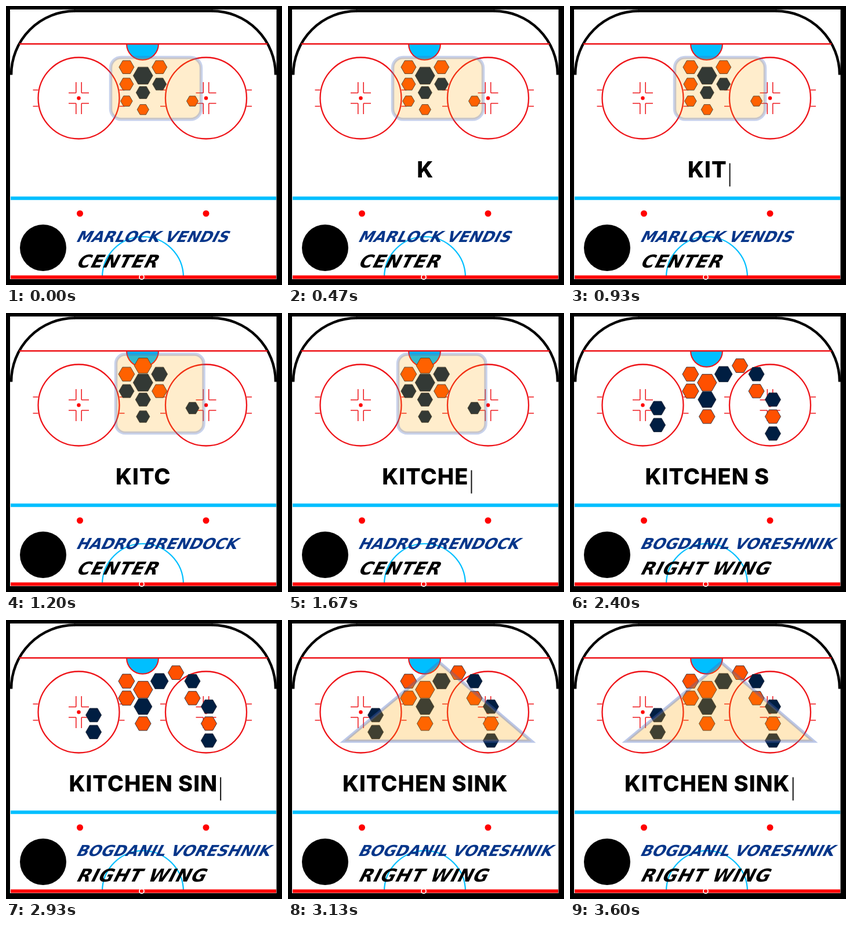
Recreate the animation shown at these times as an HTML page with a canvas. Size 476 px wide and 480 px high, loop 3.99 s.

```html
<!DOCTYPE html>
<html lang="en">
<head>
<meta charset="utf-8">
<title>Shot zones</title>
<style>
  html, body { margin: 0; width: 476px; height: 480px; overflow: hidden; background: #000; }
  canvas { display: block; }
</style>
</head>
<body>
<canvas id="stage" width="476" height="480"></canvas>
<script>
const ctx = document.getElementById('stage').getContext('2d');
const LOOP = 3990, FPS = 15, LAST_STEP = 54;
const RED = '#ee1419', PURE_RED = '#f00', SKY = '#00bfff', NAVY = '#06368a';
const HEX_COLORS = { o: '#ff5000', n: '#001e42' };
const TITLE = 'KITCHEN SINK';

// Each run is [column, top row, one letter per hexagon going down].
// Hexagons grow from `size` towards the hot spot.
const slides = [
  {
    name: 'MARLOCK VENDIS', role: 'CENTER', size: 10, hot: [0, -2.5],
    runs: [[-1, -3, 'ooo'], [0, -2, 'nno'], [1, -3, 'on'], [3, 1, 'o']],
    zone: () => ctx.roundRect(180.5, 88.5, 156, 106.5, 18), tint: 0.2
  },
  {
    name: 'HADRO BRENDOCK', role: 'CENTER', size: 11.5, hot: [0, -2.5],
    runs: [[-1, -3, 'on'], [0, -4, 'onnn'], [1, -3, 'no'], [3, 1, 'n']],
    zone: () => ctx.roundRect(189.5, 71, 151.5, 135.5, 16), tint: 0.2
  },
  {
    name: 'BOGDANIL VORESHNIK', role: 'RIGHT WING', size: 13.5, hot: [0.4, -1.5],
    runs: [[-3, 1, 'nn'], [-1, -3, 'oo'], [0, -2, 'ono'], [1, -3, 'n'],
           [2, -4, 'o'], [3, -3, 'no'], [4, 0, 'non']],
    zone: () => polygon([[261, 73], [420, 208.5], [97, 208.5]]), tint: 0.25
  }
];

function polygon(points) {
  points.forEach(([x, y]) => ctx.lineTo(x, y));
  ctx.closePath();
}

function line(x1, y1, x2, y2, color, width) {
  ctx.beginPath();
  ctx.moveTo(x1, y1);
  ctx.lineTo(x2, y2);
  ctx.strokeStyle = color;
  ctx.lineWidth = width;
  ctx.stroke();
}

function arc(x, y, r, from, to, color, width) {
  ctx.beginPath();
  ctx.arc(x, y, r, from * Math.PI, to * Math.PI);
  ctx.strokeStyle = color;
  ctx.lineWidth = width;
  ctx.stroke();
}

function disc(x, y, r, color) {
  ctx.beginPath();
  ctx.arc(x, y, r, 0, 2 * Math.PI);
  ctx.fillStyle = color;
  ctx.fill();
}

function faceOff(x) {
  const y = 158.5;
  arc(x, y, 70, 0, 2, RED, 2.3);
  disc(x, y, 3.2, PURE_RED);
  for (const sx of [-1, 1]) {
    for (const sy of [-1, 1]) {
      const cx = x + sx * 4.7, cy = y + sy * 9;
      line(cx, cy, cx, y + sy * 27.5, RED, 1.5);
      line(cx, cy, x + sx * 17.5, cy, RED, 1.5);
      line(x + sx * 70, y + sy * 14, x + sx * 79, y + sy * 14, RED, 1.5);
    }
  }
}

function drawRink() {
  ctx.fillStyle = '#000';
  ctx.fillRect(0, 0, 476, 480);
  ctx.fillStyle = '#fff';
  ctx.fillRect(7, 6, 459.5, 464);

  line(118, 8.5, 356, 8.5, '#000', 4.5);
  arc(119, 118.5, 110, 1, 1.5, '#000', 4.5);
  arc(355, 118.5, 110, 1.5, 2, '#000', 4.5);

  ctx.beginPath();
  ctx.arc(235.5, 65.3, 27.5, 0, Math.PI);
  ctx.fillStyle = SKY;
  ctx.fill();
  arc(235.5, 65.3, 27.5, 0, 1, RED, 2);
  line(23, 65.3, 451, 65.3, RED, 2.4);

  [125.5, 345].forEach(faceOff);

  line(8, 330.8, 466, 330.8, SKY, 6);
  for (const x of [127.5, 345]) disc(x, 357, 5.5, PURE_RED);
  arc(236, 467, 70, 1, 2, SKY, 2.2);
  line(8, 466.4, 466, 466.4, PURE_RED, 6);
  arc(234, 466.4, 4, 0, 2, '#fff', 1.8);
}

function drawHex(col, row, r, color) {
  const x = 236.3 + col * 28.4, y = 149 + row * 14.6;
  ctx.beginPath();
  for (let i = 0; i < 6; i++) {
    const angle = i * Math.PI / 3;
    ctx.lineTo(x + r * Math.cos(angle), y + r * Math.sin(angle));
  }
  ctx.closePath();
  ctx.fillStyle = color;
  ctx.fill();
  ctx.strokeStyle = '#222a38';
  ctx.lineWidth = 0.9;
  ctx.stroke();
}

function drawShots({ runs, size, hot }) {
  for (const [col, top, colors] of runs) {
    [...colors].forEach((key, i) => {
      const row = top + 2 * i;
      const distance = Math.hypot(col - hot[0], (row - hot[1]) / 2);
      const heat = Math.exp(-(distance ** 2) / 1.2);
      drawHex(col, row, size + (17.3 - size) * heat, HEX_COLORS[key]);
    });
  }
}

function drawZone({ zone, tint }) {
  ctx.beginPath();
  zone();
  ctx.fillStyle = `rgba(255, 165, 0, ${tint})`;
  ctx.fill();
  ctx.strokeStyle = `rgba(68, 100, 190, ${tint * 1.45})`;
  ctx.lineWidth = 5.5;
  ctx.stroke();
}

function slanted(text, y, size, spacing, color) {
  ctx.save();
  ctx.transform(1, 0, -0.5, 1, 119.5, y);
  ctx.font = `bold ${size}px "DejaVu Sans", sans-serif`;
  ctx.letterSpacing = spacing;
  ctx.fillStyle = color;
  ctx.fillText(text, 0, 0);
  ctx.restore();
}

function drawTitle(letters, cursorOn) {
  const text = TITLE.slice(0, letters).trimEnd();
  ctx.save();
  ctx.font = '800 38px Inter, sans-serif';
  ctx.letterSpacing = '1px';
  ctx.textAlign = 'center';
  ctx.fillStyle = '#000';
  ctx.fillText(text, 236.8, 295);
  const cursorX = 241.8 + ctx.measureText(text).width / 2;
  ctx.restore();
  if (cursorOn) line(cursorX, 270.5, cursorX, 310.5, '#111', 2);
}

function render(time) {
  const step = Math.min(LAST_STEP, Math.floor(time * FPS / 1000 + 0.1));
  const second = Math.floor(step / FPS);
  const slide = slides[Math.min(second, 2)];

  drawRink();
  drawShots(slide);
  if (second !== 2) drawZone(slide);

  disc(64, 416, 40, '#000');
  slanted(slide.name, 406, 26, '0px', NAVY);
  slanted(slide.role, 450, 30.5, '1px', '#000');

  // Four letters a second; the cursor shows in the second half of each second.
  drawTitle(Math.floor(step * 4 / FPS), step % FPS >= FPS / 2);
}

const start = performance.now();
function tick() {
  render((performance.now() - start) % LOOP);
  requestAnimationFrame(tick);
}
tick();
</script>
</body>
</html>
```
